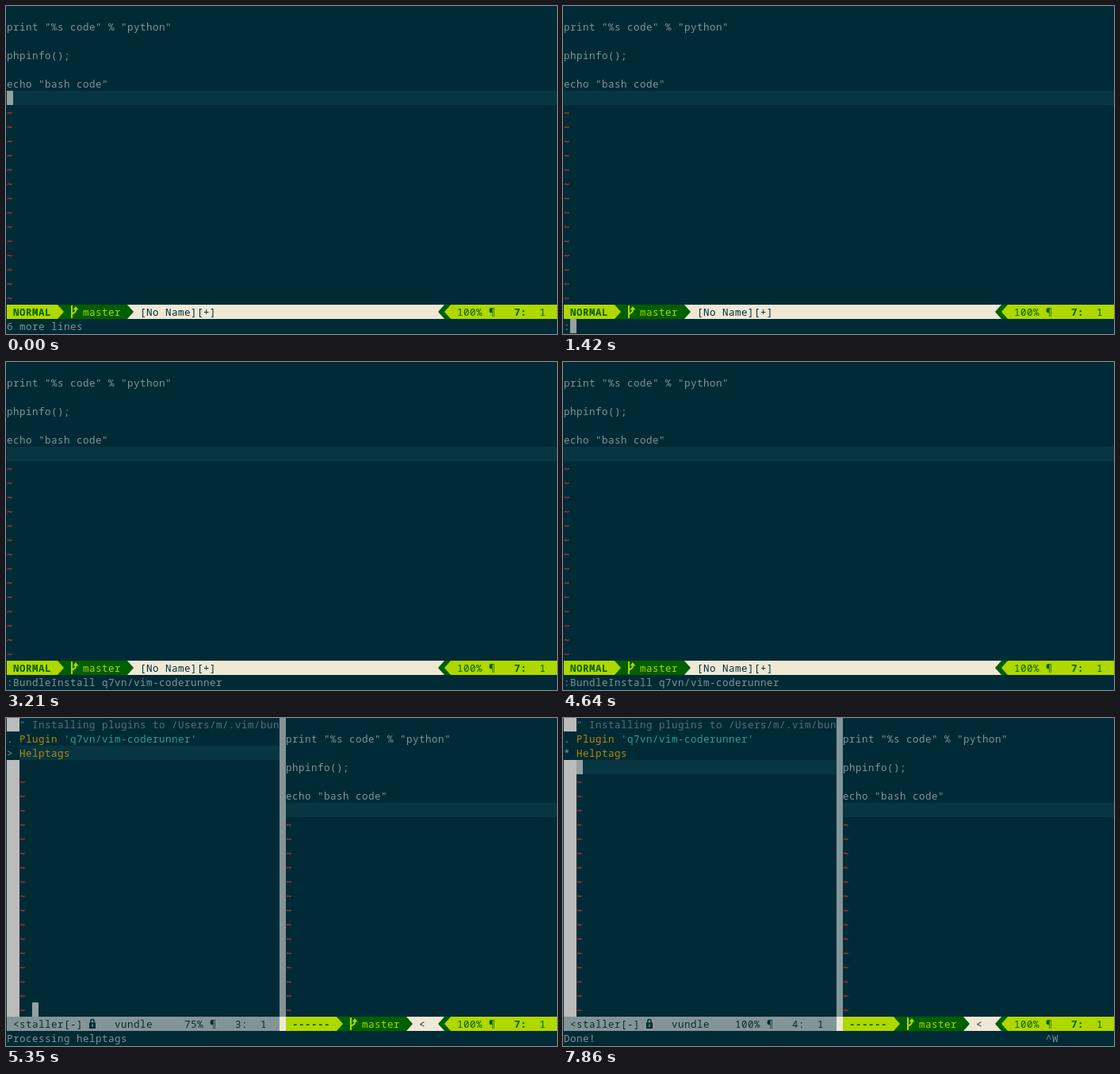
Animation of 695 by 414 pixels, one loop 8000 ms. Source, as an HTML page:

```html
<!DOCTYPE html>
<html lang="en">
<head>
<meta charset="utf-8">
<title>Editor plugin install</title>
<style>
html, body { margin: 0; width: 100%; height: 100%; overflow: hidden; background: #002b36; }
svg { display: block; width: 695px; height: 414px; }
text { font: 12.5px "Noto Sans Mono", monospace; letter-spacing: .5px; white-space: pre; }
.b { font-weight: 700; }
</style>
</head>
<body>
<svg id="stage" viewBox="0 0 695 414"></svg>
<script>
const LOOP = 8000, CW = 8, RH = 18, WIDTH = 695;
const C = {
  bg: '#002b36', line: '#073642', text: '#839496', cursor: '#93a1a1', comment: '#586e75',
  red: '#dc322f', yellow: '#b58900', cyan: '#2aa198', lime: '#afd700', green: '#005f00',
  cream: '#eee8d5', sign: '#bcbcbc'
};
const PLUGIN = 'q7vn/vim-coderunner';
const COMMAND = ':BundleInstall ' + PLUGIN;
const STATUS = 21, CMD = 22, DIVIDER = 43, EDGE = 90;

const stage = document.getElementById('stage');
const X = col => 1 + col * CW;
const Y = row => row * RH - 1;
const escapeText = s => s.replace(/&/g, '&amp;').replace(/</g, '&lt;').replace(/>/g, '&gt;');

function box(col, row, endCol, fill, rows = 1) {
  const x = X(col), w = Math.min(X(endCol), WIDTH) - x;
  return `<rect x="${x}" y="${Y(row)}" width="${w}" height="${rows * RH}" fill="${fill}"/>`;
}

function write(col, row, s, fill = C.text, bold = false) {
  return `<text x="${X(col)}" y="${Y(row) + 14}" fill="${fill}"${bold ? ' class="b"' : ''}>${escapeText(s)}</text>`;
}

const cursor = (col, row) => box(col, row, col + 1, C.cursor);

// Powerline separator filling one cell; dir 1 points right, -1 left.
function arrow(col, dir, fill) {
  const base = X(dir > 0 ? col : col + 1), y = Y(STATUS);
  return `<path d="M${base} ${y}l${dir * CW} ${RH / 2}l${-dir * CW} ${RH / 2}z" fill="${fill}"/>`;
}

function branch(col) {
  return `<g transform="translate(${X(col)} ${Y(STATUS)})" fill="none" stroke="${C.lime}" stroke-width="2">
    <path d="M2 1V17M2 13C2 10 7 11 7 7V5"/>
    <path d="M3.5 6.5L7 2L10.5 6.5z" fill="${C.lime}" stroke="none"/></g>`;
}

function lock(col) {
  return `<g transform="translate(${X(col)} ${Y(STATUS)})">
    <path d="M2 8V5.5a2 2 0 0 1 4 0V8" fill="none" stroke="${C.bg}" stroke-width="1.6"/>
    <path d="M0 7.5H8V15H0zM3.3 9.5V13H4.7V9.5z" fill="${C.bg}" fill-rule="evenodd"/></g>`;
}

function tildes(col, first) {
  let out = '';
  for (let row = first; row < STATUS; row++) out += write(col, row, '~', C.red, true);
  return out;
}

function codePane(col) {
  return box(col, 6, EDGE, C.line)
    + write(col, 1, 'print "%s code" % "python"')
    + write(col, 3, 'phpinfo();')
    + write(col, 5, 'echo "bash code"')
    + tildes(col, 7);
}

function activeStatus(col, mode, name) {
  return box(col, STATUS, col + 8, C.lime)
    + box(col + 8, STATUS, col + 19, C.green)
    + arrow(col + 8, 1, C.lime)
    + box(col + 19, STATUS, 69, C.cream)
    + arrow(col + 19, 1, C.green)
    + arrow(68, -1, C.green)
    + box(69, STATUS, 70, C.green)
    + arrow(69, -1, C.lime)
    + box(70, STATUS, EDGE, C.lime)
    + write(col + 1, STATUS, mode, C.green, true)
    + branch(col + 10)
    + write(col + 12, STATUS, 'master', C.lime)
    + write(col + 21, STATUS, name, C.bg)
    + write(71, STATUS, '100% ¶', C.green)
    + write(80, STATUS, '7:', C.green, true)
    + write(84, STATUS, '1', C.green);
}

function installerStatus(percent, line) {
  return box(0, STATUS, DIVIDER, C.text)
    + write(1, STATUS, '<staller[-]', C.bg)
    + lock(13)
    + write(17, STATUS, 'vundle', C.bg)
    + write(27, STATUS, percent.padStart(4) + ' ¶', C.bg)
    + write(36, STATUS, line + ':  1', C.bg);
}

// mark is the sign beside Helptags; without it there is no sign column.
function installer(line, percent, mark) {
  const col = mark ? 2 : 0;
  const title = '" Installing plugins to /Users/m/.vim/bundle'.slice(0, DIVIDER - col);
  const signs = mark
    ? box(0, 0, 2, C.sign) + box(0, 3, 2, C.sign, 18) + write(0, 1, '.') + write(0, 2, mark)
    : '';
  return box(col, line - 1, DIVIDER, C.line) + signs
    + write(col, 0, title, C.comment)
    + write(col, 1, 'Plugin', C.yellow)
    + write(col + 7, 1, `'${PLUGIN}'`, C.cyan)
    + write(col, 2, 'Helptags', C.yellow)
    + tildes(col, 4)
    + installerStatus(percent, line);
}

const single = (message, cur = '') =>
  codePane(0) + activeStatus(0, 'NORMAL', '[No Name][+]') + write(0, CMD, message) + cur;

const split = (left, message, cur = '') =>
  left + codePane(44)
    + box(DIVIDER, 0, 44, C.text, STATUS) + box(DIVIDER, STATUS, 44, C.cream)
    + activeStatus(44, '------', '<') + write(0, CMD, message) + cur;

const idle = on => single('6 more lines', on ? cursor(0, 6) : '');
const typed = on => single(COMMAND, on ? cursor(COMMAND.length, CMD) : '');
const done = (on, keys = '') =>
  split(installer(4, '100%', '*'), 'Done!', (on ? cursor(2, 3) : '') + write(76, CMD, keys));

const scenes = [
  [0, () => idle(true)],
  [350, () => idle(false)],
  [710, () => idle(true)],
  [1060, () => idle(false)],
  [1420, () => single(':', cursor(1, CMD))],
  [2130, () => typed(true)],
  [3210, () => typed(false)],
  [3570, () => typed(true)],
  [3920, () => typed(false)],
  [4280, () => typed(true)],
  [4640, () => typed(false)],
  [4990, () => split(installer(2, '50%'), '', cursor(46, 20))],
  [5350, () => split(installer(3, '75%', '>'), 'Processing helptags', cursor(4, 20))],
  [6070, () => done(true)],
  [6790, () => done(false)],
  [7150, () => done(true)],
  [7500, () => done(false)],
  [7860, () => done(true, '^W')]
];

let shown = null;
function render(time) {
  const scene = scenes.findLast(([start]) => start <= time);
  if (scene === shown) return;
  shown = scene;
  stage.innerHTML = `<rect width="695" height="414" fill="${C.bg}"/>` + scene[1]();
}

const begin = performance.now();
function tick() {
  render((performance.now() - begin) % LOOP);
  requestAnimationFrame(tick);
}
tick();
</script>
</body>
</html>
```
